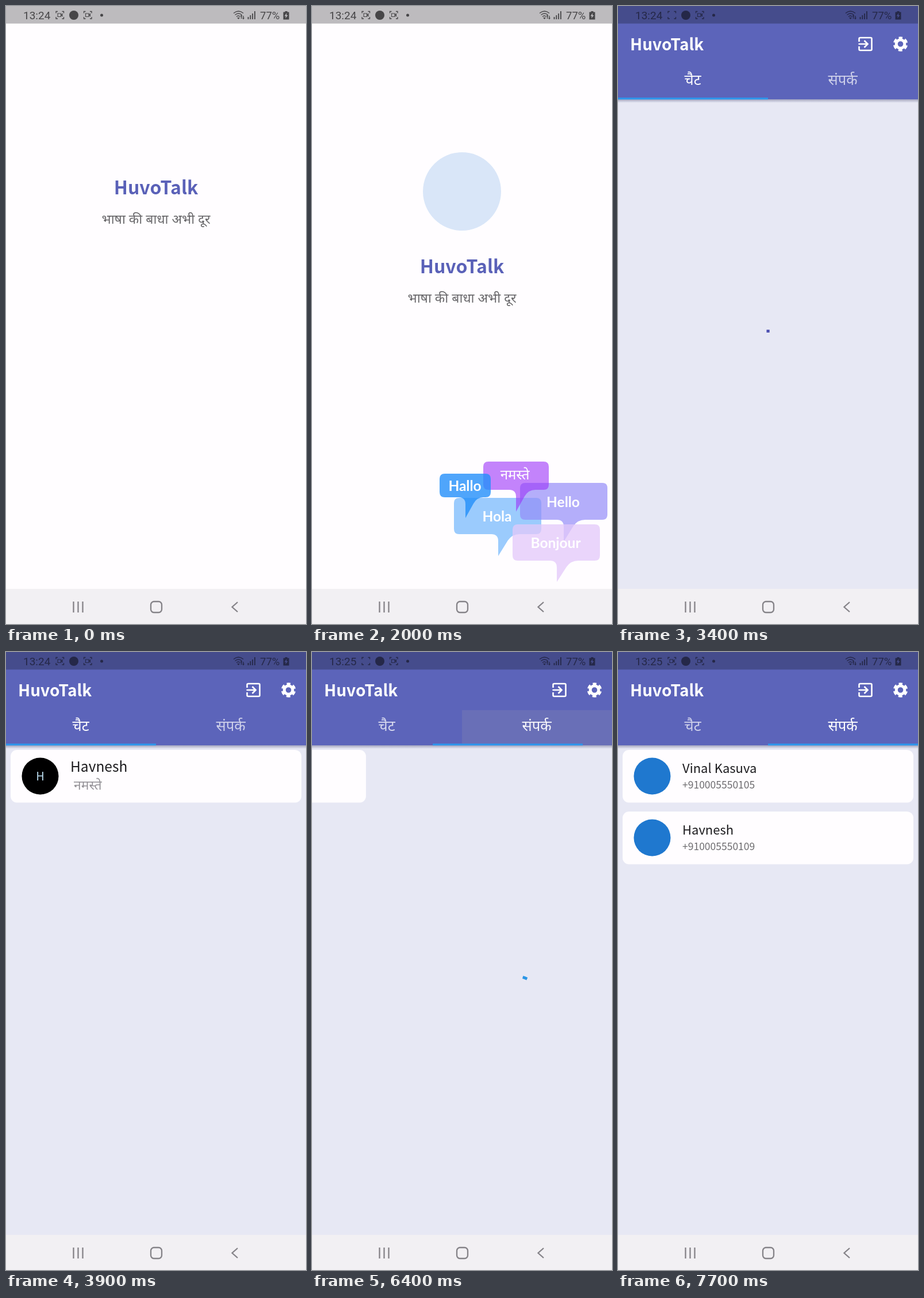
Animation, 522 px wide and 1073 px high, one loop 8 s. Source, as an HTML page:

```html
<!DOCTYPE html>
<html lang="hi">
<head>
<meta charset="utf-8">
<style>
  html, body { margin: 0; width: 100%; height: 100%; overflow: hidden; background: #fffdff; }
  svg { display: block; width: 522px; height: 1073px; }
  text { font-family: "Noto Sans CJK SC", "Noto Sans CJK JP", "Noto Sans CJK", "Noto Sans Devanagari", "Noto Sans", sans-serif; }
  .hindi { font-family: "Noto Sans Devanagari", "Noto Sans", sans-serif; }
  .status text { font-family: Roboto, sans-serif; }
  .greeting { font: 700 24.5px Lato, sans-serif; fill: #fff; }
  .greeting.hindi { font: 400 24px "Noto Sans Devanagari", "Noto Sans", sans-serif; }
  .mid { text-anchor: middle; }
  .line { fill: none; stroke: currentColor; }
</style>
</head>
<body>
<svg viewBox="0 0 522 1073">
  <defs>
    <linearGradient id="shade" x2="0" y2="1">
      <stop stop-color="#50527c" stop-opacity=".45"/>
      <stop offset="1" stop-color="#50527c" stop-opacity="0"/>
    </linearGradient>
    <path id="corners" class="line" stroke-width="1.3" d="M87 12.500V9.500H90M97.500 9.500h3v3M100.500 19v3h-3M90 22H87V19"/>
    <path id="camera" class="line" stroke-width="1.1" d="M90 13h5.500v5.500H90zM95.500 15.700l2.500-2v4z"/>
  </defs>

  <g id="splash">
    <rect width="522" height="1012" fill="#fffdff"/>
    <rect width="522" height="30.5" fill="#bdbbbe"/>
    <g id="art">
      <circle cx="261" cy="322" r="68" fill="#d9e6f8"/>
      <g id="bubbles"></g>
    </g>
    <g id="title" class="mid">
      <text x="261" y="327" font-size="32" font-weight="700" fill="#5a61b8">HuvoTalk</text>
      <text class="hindi" x="261" y="378" font-size="23" fill="#69686b">भाषा की बाधा अभी दूर</text>
    </g>
  </g>

  <g id="main">
    <rect width="522" height="1012" fill="#e7e8f4"/>
    <g id="chats"><g id="chatCard"></g></g>
    <g id="contacts"><g id="contactCards"></g></g>
    <path id="spinner" fill="none" stroke-width="5" stroke-linecap="square"/>
    <rect y="162" width="522" height="6" fill="url(#shade)"/>
    <rect width="522" height="162" fill="#5c64ba"/>
    <rect width="522" height="30.5" fill="#454c8c"/>
    <rect id="press" x="261" y="101" width="261" height="61" fill="#9a9aaa"/>
    <text x="21" y="77" font-size="28" font-weight="700" fill="#fff">HuvoTalk</text>
    <g class="line" color="#fff" stroke-width="2.6">
      <path d="M419.5 62V57q0-2 2-2H439.5q2 0 2 2V75q0 2-2 2H421.5q-2 0-2-2V70M418.5 66H434M428.5 60l6 6-6 6"/>
      <circle cx="491.5" cy="66" r="7.3" stroke-width="5"/>
      <circle cx="491.5" cy="66" r="10.5" stroke-width="4.5" stroke-dasharray="6.5 4.496" stroke-dashoffset="3.25" transform="rotate(-90 491.5 66)"/>
    </g>
    <g class="mid" font-size="25.5" fill="#fff">
      <text id="tabChats" class="hindi" x="130" y="137">चैट</text>
      <text id="tabContacts" class="hindi" x="391" y="137">संपर्क</text>
    </g>
    <rect id="marker" y="159" width="261" height="3.3" fill="#2f94ea"/>
  </g>

  <g id="status" class="status" fill="currentColor">
    <text id="clock" x="30" y="23" font-size="19"></text>
    <use href="#corners"/>
    <use id="blink" href="#camera"/>
    <circle cx="118" cy="16" r="8"/>
    <use href="#corners" x="48.5"/>
    <use href="#camera" x="48.5"/>
    <circle cx="166.5" cy="16" r="2.5"/>
    <path class="line" stroke-width="1.3" d="M396 12.5q8.5-7 17 0M398.5 15.5q6-5 12 0M401 18.5q3.5-3 6 0M409.5 22v-5M413 17v5"/>
    <path d="M402 20h5l-2.500 3zM407.500 18l2-3 2 3zM411 20.500l2 3 2-3z"/>
    <path class="line" stroke-width="1.8" d="M421.5 23v-4M425.3 23v-7M429.1 23v-10M432.900 23V9"/>
    <text x="442" y="23" font-size="18.5">77%</text>
    <path fill-rule="evenodd" d="M485.5 9h4v1.500h3V23.500h-10V10.500h3zM488.500 12l-4 5.500h2.500l-1 4 4.500-5.500h-2.500z"/>
  </g>

  <rect y="1012" width="522" height="61" fill="#f2f0f3"/>
  <g class="line" color="#858388" stroke-width="2.3">
    <path d="M117.5 1034v19M125.500 1034v19M133.500 1034v19M403 1035l-9.500 8.500 9.500 8.500"/>
    <rect x="252" y="1034" width="19" height="19" rx="5.5"/>
  </g>
</svg>
<script>
const $ = id => document.getElementById(id);
const clamp = v => Math.max(0, Math.min(1, v));
const show = (id, on) => $(id).style.display = on ? '' : 'none';
const shift = (id, x, y = 0) => $(id).setAttribute('transform', `translate(${x} ${y})`);

// A speech bubble and its word; the tail has an upright left edge above its tip
function bubble(word, x, y, w, h, tipX, tipY, color, alpha, textX, textY, extra = '') {
  const r = 9, foot = y + h, spread = 22 + w * .1;
  const d = `M${x + r} ${y}H${x + w - r}q${r} 0 ${r} ${r}V${foot - r}q0 ${r} ${-r} ${r}H${tipX + spread}
    Q${tipX + spread * .65} ${foot} ${tipX + spread * .45} ${foot + 11}L${tipX} ${tipY}V${foot + 12}
    q0 -12 -12 -12H${x + r}q${-r} 0 ${-r} ${-r}V${y + r}q0 ${-r} ${r} ${-r}z`;
  return [`<path d="${d}" fill="${color}" fill-opacity="${alpha}"/>`,
    `<text class="greeting mid ${extra}" x="${textX}" y="${textY}">${word}</text>`];
}
const greetings = [
  bubble('Hola', 247, 854, 152, 63, 324, 955, '#2590fb', .46, 322, 895),
  bubble('Hello', 362, 828, 152, 64, 438, 930, '#948ef8', .7, 437, 870),
  bubble('नमस्ते', 298, 791, 114, 49, 355, 878, '#9c32f8', .6, 353, 822, 'hindi'),
  bubble('Hallo', 222, 812, 89, 41, 267, 889, '#2490fb', .8, 266, 842),
  bubble('Bonjour', 349, 900, 152, 63, 426, 1000, '#e3c8fa', .75, 424, 941)
];
$('bubbles').innerHTML = greetings.map(g => g[0]).join('') + greetings.map(g => g[1]).join('');

const card = (y, avatar, content) => `<g transform="translate(0 ${y})">
  <rect x="8" width="506" height="91.5" rx="11" fill="#fffdff"/>
  <circle cx="59.5" cy="45.5" r="32" fill="${avatar}"/>${content}</g>`;
const contact = (y, name, phone) => card(y, '#1f78cf',
  `<text x="112" y="39.5" font-size="22" fill="#1c1b1e">${name}</text>
   <text x="112" y="66.5" font-size="17.5" fill="#6c6b6e">${phone}</text>`);
$('chatCard').innerHTML = card(170, '#000',
  `<text class="mid" x="59.5" y="53" font-size="20" fill="#b9daec">H</text>
   <text x="112" y="38" font-size="24.5" fill="#1c1b1e">Havnesh</text>
   <text class="hindi" x="118" y="69" font-size="23" fill="#959398">नमस्ते</text>`);
$('contactCards').innerHTML = contact(170, 'Vinal Kasuva', '+910005550105')
  + contact(277, 'Havnesh', '+910005550109');

// Cubic ease with control points (.4, 0) and (.2, 1), solved by bisection
function ease(x) {
  let lo = 0, hi = 1;
  for (let i = 0; i < 20; i++) {
    const s = (lo + hi) / 2;
    if (1.2 * s * (1 - s) ** 2 + .6 * s * s * (1 - s) + s ** 3 < x) lo = s; else hi = s;
  }
  return lo * lo * (3 - 2 * lo);
}

function drawSpinner(cx, age, color) {
  const u = age % 1333 / 1333, turn = age * 720 / 4444 + u * 90 - 90;
  const from = turn + 270 * ease(clamp(u * 2 - 1));
  const to = Math.max(turn + 270 * ease(clamp(u * 2)), from + .5);
  const at = deg => {
    const a = deg * Math.PI / 180;
    return `${cx + 22.5 * Math.cos(a)} ${587 + 22.5 * Math.sin(a)}`;
  };
  $('spinner').setAttribute('d', `M${at(from)}A22.5 22.5 0 ${to - from > 180 ? 1 : 0} 1 ${at(to)}`);
  $('spinner').setAttribute('stroke', color);
}

function render(t) {
  const inApp = t >= 3400;
  show('splash', !inApp);
  show('main', inApp);

  $('status').style.color = inApp ? '#252848' : '#474648';
  $('clock').textContent = t < 4900 ? '13:24' : '13:25';
  show('blink', Math.floor((t + 400) / 500) % 2 === 0);

  $('art').style.opacity = clamp((t - 100) / 300);
  shift('title', 0, t < 100 ? 0 : 137);

  const slide = t < 6400 ? 0 : t >= 6800 ? 1 : 1 - Math.exp((6300 - t) / 61.2);
  shift('chats', -522 * slide);
  shift('contacts', 522 * (1 - slide));
  show('chatCard', t >= 3700);
  show('contactCards', t >= 7100);
  $('marker').setAttribute('x', 261 * slide);
  $('tabChats').style.opacity = 1 - .3 * slide;
  $('tabContacts').style.opacity = .7 + .3 * slide;
  $('press').style.opacity = t < 6400 ? 0 : .2 * clamp((6800 - t) / 400);

  const firstLoad = t < 3700, secondLoad = t >= 6400 && t < 7100;
  show('spinner', firstLoad || secondLoad);
  if (firstLoad) drawSpinner(261, Math.max(0, t - 3500), '#4f52b2');
  else if (secondLoad) {
    const age = t < 6900 ? t - 6330 : 100;
    drawSpinner(261 + 522 * (1 - slide), age, '#2b96e6');
  }
}

const start = performance.now();
function tick() {
  render(Math.floor((performance.now() - start) % 8000 / 100) * 100);
  requestAnimationFrame(tick);
}
tick();
</script>
</body>
</html>
```
